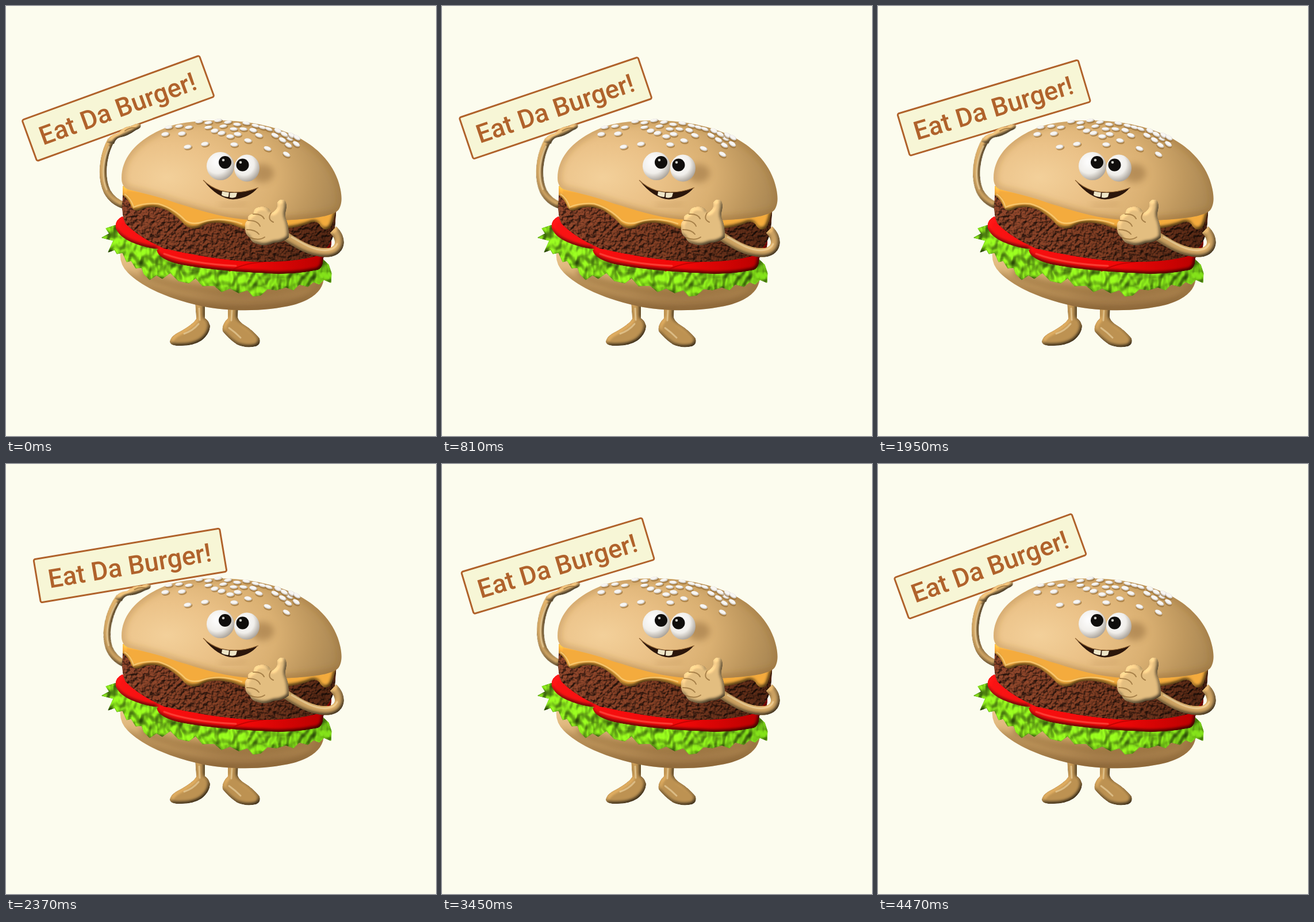
Write an HTML page that moves like this. It is 748x748 px and loops after 4500 ms.

```html
<!DOCTYPE html>
<html lang="en">
<head>
<meta charset="utf-8">
<title>Waving burger</title>
<style>
  html, body { margin: 0; width: 100%; height: 100%; overflow: hidden; background: #fcfcee; }
  svg { position: absolute; left: 0; top: 0; width: 748px; height: 748px; }
  .gold { fill: #cda669; filter: url(#round); }
  .limb { fill: none; stroke: #c59c5e; filter: url(#round); }
  .shine { fill: none; stroke: #f3dcae; stroke-width: 3; stroke-linecap: round; opacity: .55; }
  .crease { fill: none; stroke: #936c37; stroke-width: 2; stroke-linecap: round; opacity: .75; }
  text { font: 500 45px Roboto, sans-serif; fill: #b0622b; text-anchor: middle; }
</style>
</head>
<body>
<!-- sign and waving arm, behind the burger -->
<svg viewBox="0 0 748 748">
  <g id="sign">
    <g transform="translate(195 178) rotate(-20)">
      <rect x="-164" y="-38" width="328" height="76" rx="3" fill="#f7f6d6" stroke="#b0622b" stroke-width="3"/>
      <text x="-1" y="16">Eat Da Burger!</text>
    </g>
  </g>
  <g id="arm">
    <path class="limb" stroke-width="12.5" d="M183 233C168 260 164 298 176 323Q186 341 206 347"/>
    <path class="gold" d="M176 238Q177 225 195 221Q206 208 218 209Q228 202 234 206Q237 212 226 216Q211 227 197 229Q190 232 188 240Z"/>
    <path class="shine" d="M179 245C168 270 166 298 175 319"/>
    <path class="crease" d="M207 217Q216 211 225 212"/>
  </g>
</svg>

<svg viewBox="0 0 748 748">
  <defs>
    <radialGradient id="bunFill" gradientUnits="userSpaceOnUse" cx="0" cy="0" r="300" gradientTransform="translate(280 298) scale(1.05 .64)">
      <stop stop-color="#f3d09a"/><stop offset=".3" stop-color="#ebc288"/>
      <stop offset=".6" stop-color="#dab072"/><stop offset=".8" stop-color="#bf985e"/>
      <stop offset="1" stop-color="#a58350"/>
    </radialGradient>
    <linearGradient id="baseFill" x1=".1" y1="0" x2=".3" y2="1">
      <stop stop-color="#ecc78f"/><stop offset=".6" stop-color="#cfa468"/><stop offset="1" stop-color="#987142"/>
    </linearGradient>
    <linearGradient id="meatFill">
      <stop stop-color="#7a3c25"/><stop offset=".5" stop-color="#6a331d"/><stop offset="1" stop-color="#452010"/>
    </linearGradient>
    <linearGradient id="redFill" gradientUnits="userSpaceOnUse" x1="190" y1="0" x2="567" y2="0">
      <stop stop-color="#f51414"/><stop offset=".6" stop-color="#ec0808"/><stop offset="1" stop-color="#b00000"/>
    </linearGradient>
    <linearGradient id="leafFill">
      <stop stop-color="#86dc1c"/><stop offset=".6" stop-color="#84da1a"/><stop offset="1" stop-color="#6fc015"/>
    </linearGradient>
    <radialGradient id="eyeFill" cx=".38" cy=".35" r=".68">
      <stop stop-color="#fff"/><stop offset=".6" stop-color="#f0eeea"/><stop offset="1" stop-color="#aaa39a"/>
    </radialGradient>
    <filter id="round" x="-20%" y="-20%" width="140%" height="140%" color-interpolation-filters="sRGB">
      <feGaussianBlur in="SourceAlpha" stdDeviation="3.2"/>
      <feDiffuseLighting surfaceScale="5" lighting-color="#fff"><feDistantLight azimuth="235" elevation="52"/></feDiffuseLighting>
      <feComposite in2="SourceGraphic" operator="arithmetic" k1=".85" k3=".35"/>
      <feComposite in2="SourceAlpha" operator="in"/>
    </filter>
    <filter id="meat" color-interpolation-filters="sRGB">
      <feTurbulence type="fractalNoise" baseFrequency=".15" numOctaves="2" seed="4"/>
      <feDiffuseLighting surfaceScale="6" lighting-color="#fff"><feDistantLight azimuth="235" elevation="55"/></feDiffuseLighting>
      <feComposite in2="SourceGraphic" operator="arithmetic" k1=".95" k3=".3"/>
      <feComposite in2="SourceAlpha" operator="in"/>
    </filter>
    <filter id="leaf" color-interpolation-filters="sRGB">
      <feTurbulence type="fractalNoise" baseFrequency=".06 .04" numOctaves="2" seed="8"/>
      <feDiffuseLighting surfaceScale="13" lighting-color="#fff"><feDistantLight azimuth="250" elevation="55"/></feDiffuseLighting>
      <feComposite in2="SourceGraphic" operator="arithmetic" k1=".85" k3=".33"/>
      <feComposite in2="SourceAlpha" operator="in"/>
    </filter>
    <filter id="blur" x="-50%" y="-50%" width="200%" height="200%"><feGaussianBlur stdDeviation="6"/></filter>
    <path id="bun" d="M201 299C201 262 230 229 285 209C330 196 400 196 450 208C520 224 561 259 577 302C584 322 587 343 578 355C566 367 530 370 497 372Q455 376 412 371C370 367 335 354 300 344C265 331 235 325 212 319Q201 314 201 299Z"/>
    <path id="base" d="M199 430Q197 449 212 464C240 492 290 511 340 522C390 532 450 532 500 520Q553 505 553 470L480 450L260 425Z"/>
    <clipPath id="inBun"><use href="#bun"/></clipPath>
    <clipPath id="inBase"><use href="#base"/></clipPath>
  </defs>

  <path class="gold" style="fill:#b98f50" d="M329 515L331 544Q326 553 303 566Q286 574 285 584Q286 591 300 591Q325 592 340 582Q355 570 355 556Q352 546 346 543L346 515Z"/>
  <path class="gold" style="fill:#b98f50" d="M386 522L386 543Q374 555 377 566Q387 579 402 589Q418 596 435 592Q444 588 441 578Q430 564 412 553Q404 547 403 541L404 522Z"/>
  <path class="shine" d="M336 526L337 546M310 570Q325 565 335 553M393 530L392 547M388 560Q398 567 408 577"/>

  <use href="#base" fill="url(#baseFill)"/>
  <g clip-path="url(#inBase)">
    <path d="M235 462Q270 485 330 490Q420 510 550 480" fill="none" stroke="#7e5a2c" stroke-width="18" opacity=".45" filter="url(#blur)"/>
    <path d="M210 467Q290 522 420 531Q530 528 555 475" fill="none" stroke="#7d5a2b" stroke-width="10" opacity=".5" filter="url(#blur)"/>
  </g>

  <path fill="url(#leafFill)" stroke="#79cb1d" stroke-width="1.5" stroke-linejoin="round" filter="url(#leaf)"
    d="M192 381L174 387L180 396L167 403L187 408L178 428L189 424L193 431L203 429L210 445L218 443L226 456L236 455L240 466L250 476L262 468L272 474L286 464L300 478L318 482L330 473L342 487L362 486L375 497L390 491L405 499L420 494L430 505L443 503L455 492L470 494L487 489L500 494L510 484L525 488L535 480L545 484L553 476L565 481L566 465L561 450L550 440L400 440L250 412Z"/>

  <g fill="url(#redFill)" filter="url(#round)">
    <path d="M202 366Q188 373 191 387Q198 404 226 414Q250 423 275 424L300 400Z"/>
    <path d="M566 408Q567 428 552 438Q552 455 542 459Q500 468 455 465L420 440Z"/>
    <path d="M262 424Q264 440 300 449C350 459 410 463 455 465Q502 468 545 458Q552 452 551 436L400 435L290 415Z"/>
  </g>
  <path d="M275 431Q320 448 400 452" fill="none" stroke="#ff5a4c" stroke-width="3" stroke-linecap="round" opacity=".6"/>
  <path d="M388 462Q410 448 448 445" fill="none" stroke="#a80000" stroke-width="2" opacity=".6"/>

  <path fill="url(#meatFill)" filter="url(#meat)"
    d="M203 325L202 352Q203 371 208 379Q232 403 275 422C325 433 380 443 430 445Q500 447 543 434Q566 420 572 390L575 350L400 350Z"/>

  <path fill="#efa83c" filter="url(#round)"
    d="M203 313L203 329Q214 337 218 350Q225 361 240 352Q263 346 283 357Q302 370 310 380Q322 391 338 385Q350 376 372 377Q392 379 410 387Q440 395 470 388Q500 388 526 379Q541 371 547 383Q555 393 564 386Q570 376 574 355L490 345L300 325Z"/>
  <path d="M206 327Q217 334 222 350Q240 342 265 344Q292 352 312 373Q325 382 344 375Q375 366 411 379" fill="none" stroke="#fccf78" stroke-width="2.5" opacity=".8"/>

  <use href="#bun" fill="url(#bunFill)"/>
  <g clip-path="url(#inBun)" fill="none" stroke="#94652c" filter="url(#blur)">
    <use href="#bun" stroke-width="8" opacity=".4"/>
    <path d="M290 350Q330 362 365 369Q450 383 580 360" stroke-width="9" opacity=".4"/>
  </g>
  <g id="seeds"></g>

  <ellipse cx="446" cy="291" rx="20" ry="16" fill="#7d572a" opacity=".4" filter="url(#blur)"/>
  <ellipse cx="419" cy="282" rx="22" ry="23.5" fill="url(#eyeFill)"/>
  <ellipse cx="373" cy="278.5" rx="24" ry="24.5" fill="url(#eyeFill)"/>
  <g fill="#100e0c"><circle cx="381" cy="272" r="11"/><circle cx="411.5" cy="276.5" r="11"/></g>
  <g fill="#cfcfc8"><circle cx="378" cy="268" r="2.3"/><circle cx="408" cy="272" r="2.3"/></g>

  <path d="M343 303Q355 315 373 321Q405 329 438 316Q424 334 395 336.5Q368 335 343 303Z" fill="#2b160b"/>
  <path d="M343 303Q355 315 373 321Q405 329 439 316" fill="none" stroke="#8e6130" stroke-width="1.2"/>
  <path d="M376 322.5L388 324.5L387 332Q381 333 375 329ZM389.5 325L402 325L400 332Q395 335 389 333Z" fill="#efe6c8"/>
  <path d="M372 345Q395 351 418 342" fill="none" stroke="#a5763c" stroke-width="4" opacity=".4" filter="url(#blur)"/>

  <path class="limb" stroke-width="16" d="M482 398C507 414 530 429 556 429C584 429 586 405 569 389"/>
  <path class="shine" d="M497 402C518 414 535 425 555 425Q572 424 576 414"/>
  <path class="gold" style="fill:#dfba7d" d="M416 386Q414 376 421 372Q418 363 430 361Q430 350 443 349Q456 347 462 360Q474 353 471 344Q474 334 484 337Q490 342 487 356Q484 366 489 375Q493 388 492 403Q481 412 466 412Q451 419 440 415Q426 412 424 403Q415 397 416 386Z"/>
  <path class="crease" d="M430 362Q445 361 449 370M421 373Q438 373 442 383M419 389Q434 389 440 397M461 360Q454 371 465 376M425 403Q440 409 450 402"/>
</svg>

<script>
  const seedSpots = [
    283, 211, 277, 223, 306, 222, 316, 245, 318, 211, 346, 240, 363, 217, 397, 241, 390, 227, 421, 234,
    455, 248, 488, 258, 491, 242, 493, 230, 505, 240, 336, 201, 352, 203, 369, 199, 386, 202, 402, 206,
    418, 204, 434, 208, 352, 211, 378, 209, 396, 214, 413, 214, 430, 216, 446, 211, 440, 225, 457, 214,
    468, 225, 473, 217, 484, 223, 497, 225, 301, 209, 403, 223, 375, 221, 481, 233, 506, 229
  ];
  const oval = (x, y, rx, ry, fill) => `<ellipse cx="${x}" cy="${y}" rx="${rx}" ry="${ry}" fill="${fill}"/>`;
  let seeds = '';
  for (let i = 0; i < seedSpots.length; i += 2) {
    const [x, y] = seedSpots.slice(i, i + 2);
    const angle = x < 390 ? -10 : (x - 390) * .28;
    const ry = y < 215 ? 2.9 : 3.7;
    seeds += `<g transform="translate(${x} ${y}) rotate(${angle})">` +
      oval(1, 2, 7.2, ry + .4, '#91672f99') + oval(0, 0, 6.9, ry, '#d3cec8') + oval(-.6, -.7, 5.8, ry - .9, '#f8f6f3') + '</g>';
  }
  document.getElementById('seeds').innerHTML = seeds;

  const sign = document.getElementById('sign');
  const arm = document.getElementById('arm');
  const HALF = 450;

  function draw(now) {
    const phase = now % (2 * HALF) / HALF;
    const p = phase < 1 ? phase : 2 - phase;
    const eased = p * p * (3 - 2 * p);
    sign.setAttribute('transform', `rotate(${12.8 * eased} 214 291)`);
    arm.setAttribute('transform', `rotate(${9 * eased} 205 345)`);
    requestAnimationFrame(draw);
  }
  draw(0);
</script>
</body>
</html>
```
